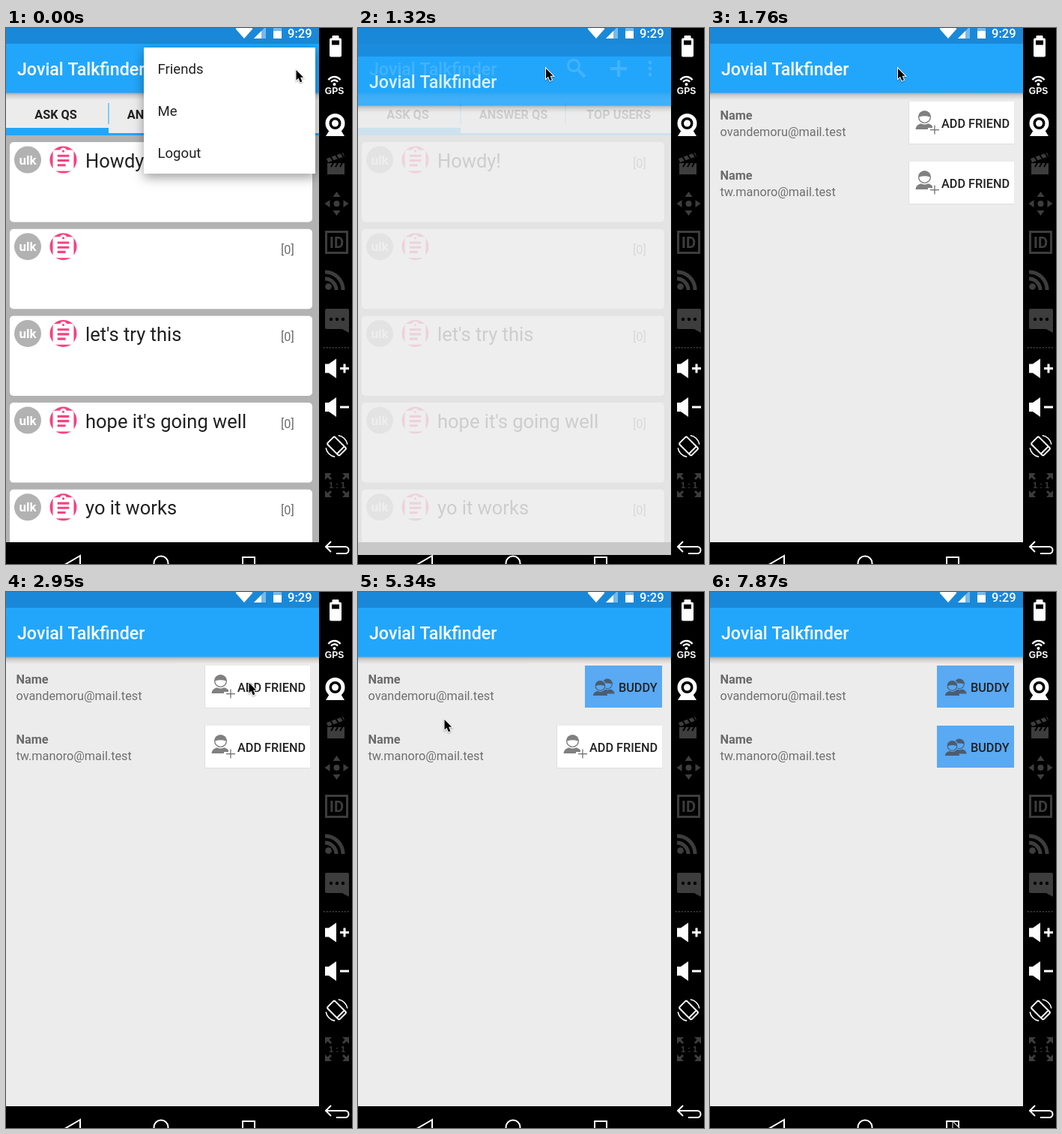
Animation, 462 px wide and 714 px high, one loop 8000 ms. Source, as an HTML page with a canvas:

```html
<!DOCTYPE html>
<html lang="en">
<head>
<meta charset="utf-8">
<title>Friends list</title>
<style>
html, body { margin: 0; width: 100%; height: 100%; overflow: hidden; background: #000; }
canvas { display: block; width: 462px; height: 714px; }
</style>
</head>
<body>
<canvas id="stage" width="462" height="714"></canvas>
<script>
const LOOP = 8000, W = 418, BOTTOM = 685;
const ENTER = 1320, LOADED = 1760;
const BLUE = '#22a6fc', DARK_BLUE = '#1a88d8', PAGE = '#ececec', DIM = '#3d3d3d';
const ROBOTO = 'Roboto, Arial, sans-serif', ARIAL = '"Liberation Sans", Arial, sans-serif';
const TITLE = 'Jovial Talkfinder', USER = 'ulk';
const EMAILS = ['ovandemoru@mail.test', 'tw.manoro@mail.test'];
const POSTS = ['Howdy!', '', "let's try this", "hope it's going well", 'yo it works'];

const stage = document.getElementById('stage').getContext('2d');
const layer = document.createElement('canvas');
layer.width = W;
layer.height = BOTTOM;
const layerCtx = layer.getContext('2d');
let g = stage;

// Cursor moves: start time, time per step, then one point per step; null = hidden
const MOVES = [
  [0, 150, [387.5, 56]],
  [150, 146, [386, 77], [352, 73], [325, 62], [296, 50], [268, 47], [251, 54]],
  [2360, 147.5, [275, 66], [310, 85], [344, 106], [338, 117], [324.5, 121]],
  [4740, 150, [270, 117], [213.5, 114]],
  [5190, 150, [155, 138], [115.5, 170], [215, 203], [332.5, 227]],
  [5940, 150, [314, 208], [301.5, 196]],
  [6980, 140, [286.5, 400], [307.5, 630]],
  [7420, 300, null],
  [7720, 150, [325, 708], [324.5, 706]]
];

const CLIPBOARD = new Path2D('M19 3h-4.2a3 3 0 0 0-5.6 0H5a2 2 0 0 0-2 2v14a2 2 0 0 0 2 2h14a2 2 0 0 0 2-2V5a2 2 0 0 0-2-2z' +
  'm-7 0a1 1 0 0 1 0 2a1 1 0 0 1 0-2zm2 14H7v-2h7zm3-4H7v-2h10zm0-4H7V7h10z');
const ARROW = new Path2D('M0 0V13.5L3 10.7L5.3 16.3L7.9 15.2L5.6 9.8H9.6Z');

function rect(x, y, w, h, color) {
  g.fillStyle = color;
  g.fillRect(x, y, w, h);
}

function round(x, y, w, h, r, color) {
  g.fillStyle = color;
  g.beginPath();
  g.roundRect(x, y, w, h, r);
  g.fill();
}

function disc(x, y, r, color) {
  g.fillStyle = color;
  g.beginPath();
  g.arc(x, y, r, 0, Math.PI * 2);
  g.fill();
}

function arc(x, y, r, from, to, color, width) {
  g.strokeStyle = color;
  g.lineWidth = width;
  g.beginPath();
  g.arc(x, y, r, from * Math.PI, to * Math.PI);
  g.stroke();
}

function trace(points) {
  g.beginPath();
  for (let i = 0; i < points.length; i += 2) g.lineTo(points[i], points[i + 1]);
}

function poly(points, color) {
  trace(points);
  g.closePath();
  g.fillStyle = color;
  g.fill();
}

function line(points, color, width) {
  trace(points);
  g.strokeStyle = color;
  g.lineWidth = width;
  g.stroke();
}

function text(str, x, y, size, color, weight = 400, align = 'left', family = ROBOTO) {
  g.font = `${weight} ${size}px ${family}`;
  g.textAlign = align;
  g.fillStyle = color;
  g.fillText(str, x, y);
}

function at(x, y, scale, paint) {
  g.save();
  g.translate(x, y);
  g.scale(scale, scale);
  paint();
  g.restore();
}

function header() {
  const fade = g.createLinearGradient(0, 86, 0, 96);
  fade.addColorStop(0, 'rgba(0,0,0,.3)');
  fade.addColorStop(0.4, 'rgba(0,0,0,.12)');
  fade.addColorStop(1, 'rgba(0,0,0,0)');
  rect(0, 86, W, 10, fade);
  rect(0, 0, W, 21, DARK_BLUE);
  rect(0, 21, W, 65.5, BLUE);
  text(TITLE, 15, 62.5, 23.2, '#fff', 500);
}

function card(post, y) {
  round(5, y, 404, 106.5, 5, '#fff');
  disc(29, y + 23.5, 18, '#b2b2b2');
  text(USER, 29, y + 29.5, 17, '#fff', 700, 'center');
  disc(76.5, y + 23.5, 18, '#f5427f');
  at(57.9, y + 5.9, 1.55, () => {
    g.fillStyle = '#fff';
    g.fill(CLIPBOARD, 'evenodd');
  });
  text(post, 106, y + 33.5, 25.5, '#212121');
  text('[0]', 367, y + 33.5, 16.26, '#6c6c6c');
}

function listScreen(menuOpen) {
  rect(0, 86, W, BOTTOM - 86, '#b2b2b2');
  rect(0, 86, W, 54, PAGE);
  header();
  rect(0, 140, W, 3, BLUE);
  rect(0, 133, 137, 10, BLUE);
  rect(136.5, 100, 1, 28, BLUE);
  rect(276.5, 100, 1, 28, BLUE);
  [['ASK QS', 66.5], ['ANSWER QS', 207.5], ['TOP USERS', 348]].forEach(([s, x]) =>
    text(s, x, 121, 16.26, '#212121', 700, 'center'));
  POSTS.forEach((post, i) => card(post, 152 + i * 115.7));
  if (menuOpen) menu();
  else actions();
  rect(0, BOTTOM, W, 29, '#000');
}

function actions() {
  const color = '#fff';
  arc(288, 50, 7.5, 0, 2, color, 3);
  line([293, 55, 303, 65], color, 4);
  rect(337, 52, 22, 4, color);
  rect(346, 43, 4, 22, color);
  [46, 54, 62].forEach(y => disc(390, y, 2.4, color));
}

function menu() {
  g.save();
  g.shadowColor = 'rgba(0,0,0,.38)';
  g.shadowBlur = 14;
  g.shadowOffsetY = 5;
  rect(184, 26, 229, 168, '#fff');
  g.restore();
  ['Friends', 'Me', 'Logout'].forEach((s, i) => text(s, 202.5, 60.5 + i * 56.4, 18.58, '#212121'));
}

// Head and shoulders around the centre of the head
function person(color, back) {
  g.fillStyle = color;
  g.beginPath();
  g.moveTo(-12, 17);
  g.quadraticCurveTo(-12, 11, -4, 9);
  g.lineTo(4, 9);
  g.quadraticCurveTo(12, 11, 12, 17);
  g.fill();
  disc(0, 0.5, 10, back);
  disc(0, 0.5, 8.6, color);
  g.fillStyle = back;
  g.beginPath();
  g.arc(0, 0.5, 7.2, 0, Math.PI);
  g.quadraticCurveTo(0, -2, 7.2, 0.5);
  g.fill();
}

function friendButton(y, added) {
  if (added) {
    const blue = '#59a9f3', ink = '#4b5c70';
    rect(303, y, 103, 56, blue);
    at(333, y + 24, 0.8, () => person(ink, blue));
    at(323.5, y + 26.5, 0.8, () => person(ink, blue));
    text('BUDDY', 348, y + 34.5, 16.26, '#212121', 500);
  } else {
    rect(265, y, 141, 57, '#dedede');
    rect(266, y, 140, 56, '#fff');
    at(286.5, y + 20, 1, () => person('#808080', '#fff'));
    rect(291, y + 35, 16, 5, '#fff');
    rect(297, y + 30, 5, 14, '#fff');
    rect(294, y + 37, 12, 1.3, '#707070');
    rect(299.3, y + 31.5, 1.3, 12, '#707070');
    text('ADD FRIEND', 309, y + 34.5, 16.26, '#212121', 500);
  }
}

function friendsScreen(t) {
  rect(0, 0, W, BOTTOM, PAGE);
  header();
  if (t < LOADED) return;
  EMAILS.forEach((mail, i) => {
    text('Name', 13.5, 122 + i * 79.7, 16.26, '#6a6a6a', 700);
    text(mail, 13.5, 144 + i * 79.7, 16.26, '#6f6f6f');
    friendButton(98 + i * 80, t >= [4150, 6380][i]);
  });
}

function statusIcons() {
  g.fillStyle = '#fff';
  g.beginPath();
  g.moveTo(318, 14);
  g.lineTo(306.5, 1);
  g.quadraticCurveTo(318, -7, 329.5, 1);
  g.fill();
  poly([331, 14, 347, 14, 347, -2], '#78bae8');
  poly([331, 14, 341, 14, 341, 4], '#fff');
  rect(357, 0, 11, 14, '#78bae8');
  rect(357, 4, 11, 10, '#fff');
  text('9:29', 376, 12.5, 16.5, '#fff', 500);
}

function navIcons() {
  trace([99, 703, 80, 714, 99, 725]);
  g.closePath();
  g.strokeStyle = '#fff';
  g.lineWidth = 2;
  g.stroke();
  arc(207, 713, 9.5, 0, 2, '#fff', 2);
  g.strokeRect(316, 705, 16, 16);
}

function speaker(y, plus) {
  poly([426, y - 6, 431, y - 6, 441, y - 13, 441, y + 13, 431, y + 6, 426, y + 6], '#fff');
  rect(446, y - 1.5, 12, 3, '#fff');
  if (plus) rect(450.5, y - 6, 3, 12, '#fff');
}

function spin(x, y, turns, paint) {
  for (let i = 0; i < turns; i++) {
    g.save();
    g.translate(x, y);
    g.rotate(i * 2 * Math.PI / turns);
    paint();
    g.restore();
  }
}

function sidePanel() {
  const white = '#fff';
  rect(W, 0, 462 - W, 714, '#000');

  // battery
  round(435.5, 10, 9, 6, 1, white);
  round(432, 13.5, 16, 25, 2, white);
  rect(435, 16.5, 10, 6, '#000');

  // satellite fix
  disc(438.5, 75, 2, white);
  [5.5, 10].forEach(r => arc(438.5, 75, r, 1.2, 1.8, white, 2.4));
  text('GPS', 438.5, 87.5, 12, white, 700, 'center', ARIAL);

  // webcam
  poly([432, 136, 447, 136, 452, 144, 427, 144], white);
  disc(439.5, 127, 13, white);
  disc(439.5, 127, 8, '#000');
  disc(439.5, 127, 4.5, white);

  // clapperboard
  rect(429, 180, 23, 15, DIM);
  poly([428, 174, 450, 166, 452, 171, 430, 179], DIM);
  for (let i = 0; i < 3; i++) {
    line([433 + i * 7, 171 - i * 2.5, 437 + i * 7, 177 - i * 2.5], '#000', 2);
    line([437 + i * 6, 180, 434 + i * 6, 185], '#000', 2);
  }

  // direction pad
  disc(441.5, 234, 4, DIM);
  spin(441.5, 234, 4, () => poly([-5, -9, 0, -16, 5, -9], DIM));

  // identifier
  g.strokeStyle = DIM;
  g.lineWidth = 3;
  g.strokeRect(427.5, 271.5, 28, 28);
  text('ID', 441.5, 292.5, 20, DIM, 700, 'center');

  // feed
  disc(430.5, 344.5, 4.3, DIM);
  [15, 24].forEach(r => arc(426, 349, r, 1.5, 2, DIM, 5));

  // message
  round(426, 374, 32, 27, 2, DIM);
  poly([447, 400, 458, 400, 458, 406], DIM);
  [434, 442, 450].forEach(x => disc(x, 388, 2.2, '#000'));

  for (let x = 424; x < 458; x += 4) rect(x, 425, 1.5, 1.5, '#555');

  speaker(453.5, true);
  speaker(505, false);

  // rotate
  g.save();
  g.translate(441.5, 557);
  g.rotate(-Math.PI / 4);
  g.strokeStyle = white;
  g.lineWidth = 2;
  g.beginPath();
  g.roundRect(-7, -11.5, 14, 23, 2);
  g.stroke();
  line([-7, 7.5, 7, 7.5], white, 2);
  g.restore();
  arc(441.5, 557, 14.5, 1.55, 1.95, white, 1.6);
  arc(441.5, 557, 14.5, 0.55, 0.95, white, 1.6);

  // actual size
  spin(442, 609, 4, () => {
    poly([-16, -16, -7, -16, -16, -7], DIM);
    line([-14, -14, -8, -8], DIM, 3);
  });
  text('1 : 1', 442, 613, 11, DIM, 700, 'center', ARIAL);

  // back
  line([434, 684, 427, 691, 434, 698], white, 2);
  g.beginPath();
  g.moveTo(427, 691);
  g.lineTo(452, 691);
  g.arc(453, 695.5, 4.5, -Math.PI / 2, Math.PI / 2);
  g.lineTo(441, 700);
  g.stroke();
}

function cursorAt(t) {
  const [start, step, ...points] = MOVES.filter(m => m[0] <= t).pop();
  return points[Math.min(points.length - 1, Math.floor((t - start) / step + 1e-6))];
}

function cursor(t) {
  const p = cursorAt(t);
  if (!p) return;
  at(p[0], p[1], 1, () => {
    g.shadowColor = 'rgba(0,0,0,.35)';
    g.shadowBlur = 2;
    g.shadowOffsetY = 1;
    g.strokeStyle = '#fff';
    g.lineWidth = 2;
    g.stroke(ARROW);
    g.shadowColor = 'transparent';
    g.fillStyle = '#000';
    g.fill(ARROW);
  });
}

// The new screen rises and fades in over three steps
function enter(t) {
  const step = (LOADED - ENTER) / 3;
  const left = Math.max(0, 3 - Math.floor((t - ENTER) / step + 1e-6)) / 3;
  return { y: Math.round(17 * left ** 2.5), alpha: 1 - 0.15 * left ** 2 };
}

function draw(t) {
  g = stage;
  rect(0, 0, 462, 714, '#000');
  if (t < LOADED) listScreen(t < ENTER);
  if (t >= ENTER) {
    g = layerCtx;
    friendsScreen(t);
    g = stage;
    const { y, alpha } = enter(t);
    g.globalAlpha = alpha;
    g.drawImage(layer, 0, y);
    g.globalAlpha = 1;
  }
  statusIcons();
  navIcons();
  sidePanel();
  cursor(t);
}

const begin = performance.now();
function tick() {
  draw((performance.now() - begin) % LOOP);
  requestAnimationFrame(tick);
}
tick();
</script>
</body>
</html>
```
